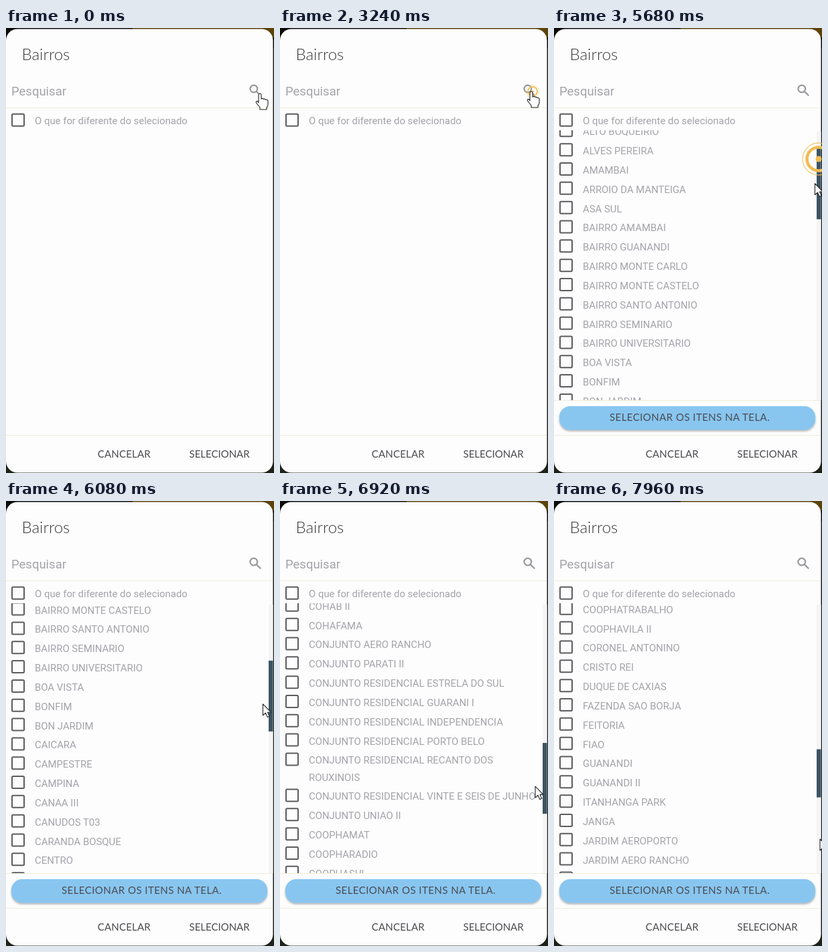
Write an HTML page that moves like this. It is 400x666 px and loops after 8000 ms.

```html
<!DOCTYPE html>
<html lang="pt">
<head>
<meta charset="utf-8">
<style>
  html, body { margin: 0; width: 100%; height: 100%; overflow: hidden; background: #181c12; }
  svg { display: block; width: 100%; height: 100%; }
  .body { font-family: Roboto, "Noto Sans", sans-serif; font-size: 14.9px; fill: #a3a3a9; }
  .ui { font-family: Lato, "Open Sans", sans-serif; font-size: 15px; fill: #4b4b50; }
  .box { fill: none; stroke: #5c5c60; stroke-width: 2; }
  .rule { stroke: #ededdf; stroke-width: 1; }
  .icon { fill: none; stroke: #97979c; stroke-width: 2.2; }
  .pointer { fill: #fdfdfd; stroke: #222; stroke-width: 1.1; stroke-linejoin: round; }
</style>
</head>
<body>
<svg viewBox="0 0 400 666" preserveAspectRatio="none">
  <defs>
    <clipPath id="view"><rect y="153" width="398" height="404"/></clipPath>
    <filter id="shade" x="-5%" y="-20%" width="110%" height="160%">
      <feDropShadow dx="0" dy="2" stdDeviation="1.8" flood-color="#555" flood-opacity=".45"/>
    </filter>
  </defs>
  <rect width="400" height="666" fill="#1e2218"/>
  <rect width="400" height="30" fill="#0a0a08"/>
  <path d="M189 0H400V14H189Z" fill="#5c430c"/>
  <rect y="1.5" width="398.5" height="664" rx="17" fill="#fdfdfd"/>

  <text class="ui" x="23.5" y="48" style="font-size:24px;font-weight:300;fill:#38383c">Bairros</text>
  <text class="body" x="8" y="101.3" style="font-size:18.5px">Pesquisar</text>
  <g class="icon"><circle cx="369.8" cy="91" r="5.4"/><path d="M373.7 94.9L380.2 101.3"/></g>
  <path class="rule" d="M0 119.5H398M0 609.5H398"/>
  <rect class="box" x="9" y="128.7" width="18" height="18" rx="1.5"/>
  <text class="body" x="43" y="144.3">O que for diferente do selecionado</text>

  <g id="results">
    <g clip-path="url(#view)"><g id="list"></g></g>
    <path class="rule" d="M0 557.5H398"/>
    <rect x="8" y="566" width="382" height="35.5" rx="16" fill="#88c6f0" filter="url(#shade)"/>
    <text class="ui" x="83" y="588.3" letter-spacing=".45">SELECIONAR OS ITENS NA TELA.</text>
    <rect x="392" y="155" width="6.5" height="402" fill="#f5f5f7"/>
    <rect id="thumb" x="392" width="6.5" fill="#3d5564"/>
  </g>

  <text class="ui" x="136.7" y="643" letter-spacing=".2">CANCELAR</text>
  <text class="ui" x="273.5" y="643">SELECIONAR</text>

  <g id="ring" fill="none" stroke="#f0bc55">
    <circle r="24" stroke-width="1.3" opacity=".75"/>
    <circle r="17.5" stroke-width="4.5"/>
    <circle r="4.5" fill="#f0bc55" stroke="none"/>
  </g>
  <g id="cursor" class="pointer">
    <path id="arrow" d="M0 0V17L4 13.3L6.8 19.5L9.7 18.2L7 12.3H12Z"/>
    <path id="hand" d="M-2 1.5Q0 -1 2 1.5V8Q4 6.5 5.5 8.5Q7.5 7.5 8.7 9.5Q11 8.6 12 11V17Q11.5 20 10 21V24H0V21L-5.5 14Q-6.5 11.5 -4 11.5L-2 13.5Z"/>
  </g>
</svg>
<script>
const LOOP = 8000, STEP = 40;
const ROW = 28.83, LINE = 25.2, BATCH = 50;
const VIEW_TOP = 155, VIEW_H = 402;
const SEARCH_AT = 3240, LIST_AT = 3640, GRAB_AT = 5360, DRAG_AT = 5500, MORE_AT = 7520;
const CLICK_MS = 480;
const DRAG_SPEED = 0.556, LATE_SPEED = 0.205; // list px per ms
const GRAB = { x: 393, y: 196 };

const names = `00471562|A|ALTO BOQUEIRIO|ALVES PEREIRA|AMAMBAI|ARROIO DA MANTEIGA|ASA SUL
BAIRRO AMAMBAI|BAIRRO GUANANDI|BAIRRO MONTE CARLO|BAIRRO MONTE CASTELO|BAIRRO SANTO ANTONIO
BAIRRO SEMINARIO|BAIRRO UNIVERSITARIO|BOA VISTA|BONFIM|BON JARDIM|CAICARA|CAMPESTRE|CAMPINA
CANAA III|CANUDOS T03|CARANDA BOSQUE|CENTRO|CENTRO-NORTE|CJ RES E SUL|COHAB II|COHAFAMA
CONJUNTO AERO RANCHO|CONJUNTO PARATI II|CONJUNTO RESIDENCIAL ESTRELA DO SUL
CONJUNTO RESIDENCIAL GUARANI I|CONJUNTO RESIDENCIAL INDEPENDENCIA
CONJUNTO RESIDENCIAL PORTO BELO|CONJUNTO RESIDENCIAL RECANTO DOS/ROUXINOIS
CONJUNTO RESIDENCIAL VINTE E SEIS DE JUNHO|CONJUNTO UNIAO II|COOPHAMAT|COOPHARADIO|COOPHASUL
COOPHATRABALHO|COOPHAVILA II|CORONEL ANTONINO|CRISTO REI|DUQUE DE CAXIAS|FAZENDA SAO BORJA
FEITORIA|FIAO|GUANANDI|GUANANDI II|ITANHANGA PARK|JANGA|JARDIM AEROPORTO|JARDIM AERO RANCHO
JARDIM AMERICA`.split(/[|\n]/);

const $ = id => document.getElementById(id);
const svgEl = (tag, attrs, text = '') => {
  const el = document.createElementNS('http://www.w3.org/2000/svg', tag);
  for (const key in attrs) el.setAttribute(key, attrs[key]);
  el.textContent = text;
  return el;
};
const show = (el, on) => el.setAttribute('visibility', on ? 'inherit' : 'hidden');
const progress = (t, start, ms) => Math.max(0, Math.min(1, (t - start) / ms));
const mix = (a, b, k) => a + (b - a) * k;
const smooth = k => k * k * (3 - 2 * k);

let rowY = 193;
const rows = names.map(name => {
  const row = svgEl('g', {});
  row.append(svgEl('rect', { class: 'box', x: 9, y: rowY - 10.7, width: 18, height: 18, rx: 1.5 }));
  const lines = name.split('/');
  lines.forEach((line, i) => {
    row.append(svgEl('text', { class: 'body', x: 43, y: rowY + 5.3 + i * LINE }, line));
  });
  rowY += ROW + (lines.length - 1) * LINE;
  $('list').append(row);
  return row;
});

const contentHeight = t => t < MORE_AT ? 1524 : 2244;

function scrollAt(t) {
  const dragged = Math.max(0, Math.min(t, MORE_AT) - DRAG_AT - 8) * DRAG_SPEED;
  return dragged + Math.max(0, t - MORE_AT) * LATE_SPEED;
}

// Pointer moves before the drag: start, duration, x, y.
const moves = [
  [0, 240, 383, 108], [1280, 40, 372, 93], [1760, 40, 392, 250], [1800, 640, 380, 52],
  [2640, 440, 375, 95], [3760, 360, 402, 140], [4920, 40, GRAB.x, GRAB.y]
];

function cursorAt(t) {
  let x = 379, y = 98;
  for (const [start, ms, toX, toY] of moves) {
    const k = smooth(progress(t, start, ms));
    x = mix(x, toX, k);
    y = mix(y, toY, k);
  }
  // The pointer runs a little ahead of the thumb it drags, then lets go.
  const held = Math.min(t, MORE_AT);
  const travel = scrollAt(held) * VIEW_H / contentHeight(0);
  const lead = 24 * progress(t, DRAG_AT - 60, 500);
  const release = progress(t, MORE_AT, 440);
  return [
    mix(x - 12 * progress(t, DRAG_AT - 60, 800), 397, release),
    mix(y + travel + lead, 506, release)
  ];
}

function drawRing(t) {
  const start = t < GRAB_AT ? SEARCH_AT : GRAB_AT;
  const k = (t - start) / CLICK_MS;
  const on = k >= 0 && k < 1;
  show($('ring'), on);
  if (!on) return;
  const [x, y] = cursorAt(start);
  $('ring').setAttribute('transform', `translate(${x + 2} ${y}) scale(${Math.min(1, .4 + k)})`);
  $('ring').setAttribute('opacity', Math.min(1, (1 - k) * 3));
}

function render(t) {
  const scroll = scrollAt(t);
  show($('results'), t >= LIST_AT);
  $('list').setAttribute('transform', `translate(0 ${-scroll})`);
  rows.forEach((row, i) => show(row, i < BATCH || t >= MORE_AT));

  const scale = VIEW_H / contentHeight(t);
  $('thumb').setAttribute('y', VIEW_TOP + scroll * scale);
  $('thumb').setAttribute('height', VIEW_H * scale);

  const [x, y] = cursorAt(t);
  const onIcon = x > 360 && x < 383 && y > 80 && y < 106;
  $('cursor').setAttribute('transform', `translate(${x} ${y})`);
  show($('arrow'), !onIcon);
  show($('hand'), onIcon);
  drawRing(t);
}

const began = performance.now();
function tick() {
  const t = (performance.now() - began) % LOOP;
  render(Math.floor(t / STEP) * STEP);
  requestAnimationFrame(tick);
}
tick();
</script>
</body>
</html>
```
